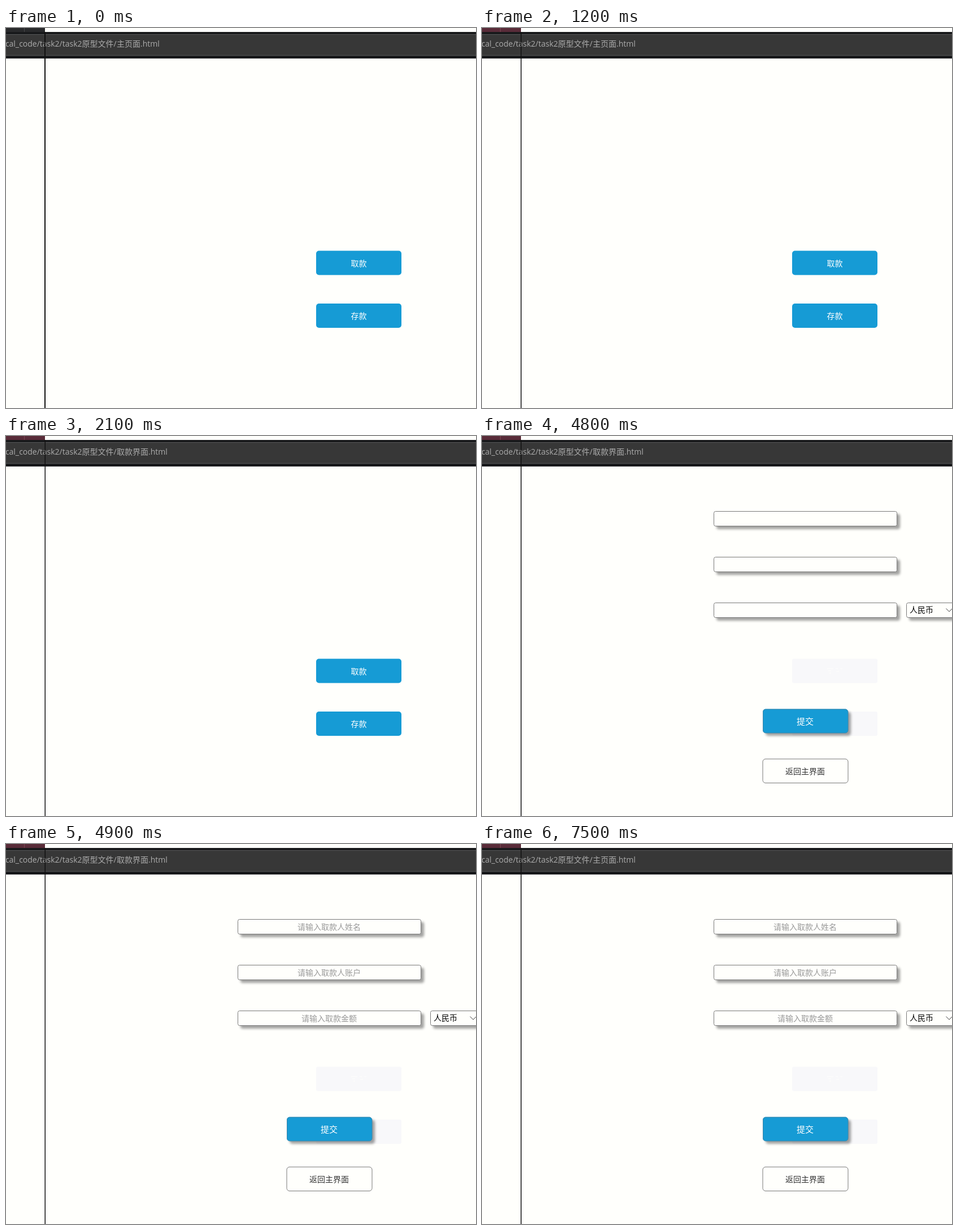
These frames come from a looping animation (832x673 px, 8000 ms). An HTML page:

```html
<!DOCTYPE html>
<html lang="zh-CN">
<head>
<meta charset="utf-8">
<title>取款</title>
<style>
html, body { margin: 0; width: 100%; height: 100%; overflow: hidden; background: #fffffc; }
svg { display: block; width: 100vw; height: 100vh; }
text { font: 14px "Noto Sans CJK SC", "Noto Sans CJK", sans-serif; }
.url { fill: #ababab; }
.latin { font-family: "Open Sans", "Noto Sans", sans-serif; }
.mid { text-anchor: middle; }
.hint { fill: #999; }
.box { fill: #fffffc; stroke: #797979; }
.blue { fill: #169bd5; }
.shade { filter: drop-shadow(5px 5px 2px rgba(0, 0, 0, .36)); }
.ghost { fill: #f8f8fa; }
</style>
</head>
<body>
<svg viewBox="0 0 832 673" preserveAspectRatio="none">
  <rect width="832" height="673" fill="#fffffc"/>
  <rect id="tab" width="69" height="7"/>
  <rect id="split" x="32" width="1" height="7"/>
  <rect y="7" width="832" height="47" fill="#18191b"/>
  <rect y="11" width="832" height="38" fill="#58595a"/>
  <rect y="12" width="832" height="36" fill="#373737"/>
  <g class="url">
    <text class="latin" x="134.5" y="33" text-anchor="end" textRendering="geometricPrecision">cal_code/task2/task2</text>
    <text x="134.5" y="33">原型文件</text>
    <text class="latin" x="190.5" y="33">/</text>
    <text id="page" x="196" y="33"></text>
    <text id="ext" class="latin" y="33">.html</text>
  </g>
  <rect id="edge" y="7" height="666" fill="#111"/>
  <g id="home"></g>
  <g id="form"></g>
</svg>
<script>
const LOOP = 8000;
const $ = id => document.getElementById(id);

const rect = (x, y, w, h, r, cls) =>
  `<rect x="${x}" y="${y}" width="${w}" height="${h}" rx="${r}" class="${cls}"/>`;
const label = (x, y, str, fill, cls = "mid", size = 14) =>
  `<text x="${x}" y="${y}" class="${cls}" fill="${fill}" style="font-size:${size}px">${str}</text>`;
const field = (y, hint) =>
  rect(410.5, y + .5, 324, 26, 3, "box shade") +
  label(572, y + 19, hint, "#999", "mid hint");

$("home").innerHTML =
  rect(549, 394.5, 151, 43, 5, "blue") + label(624.5, 422, "取款", "#fff") +
  rect(549, 488, 151, 43, 5, "blue") + label(624.5, 515, "存款", "#fff");

$("form").innerHTML =
  rect(549, 394.5, 151, 43, 3, "ghost") +
  '<path d="M611 412h11m-9 4h5m8-4h4m4 0h4m-23 8h3m9-3h5" stroke="#fffffc" fill="none"/>' +
  rect(549, 488, 151, 43, 3, "ghost") +
  field(133, "请输入取款人姓名") +
  field(214, "请输入取款人账户") +
  field(295, "请输入取款金额") +
  rect(751.5, 295.5, 100, 26, 3, "box shade") +
  label(757, 313, "人民币", "#000", "") +
  '<path d="M821.5 305.5l5.5 5.5 5.5-5.5" stroke="#444" fill="none"/>' +
  rect(497, 483.5, 151, 42.5, 5, "blue shade") +
  '<rect x="497.5" y="484" width="150.5" height="42" rx="5" fill="none" stroke="#3d86a8"/>' +
  label(572, 511, "提交", "#fff", "mid", 15) +
  rect(497, 572, 151, 42.5, 5, "box") +
  label(572, 599, "返回主界面", "#333");

const hints = document.querySelectorAll(".hint");
const show = (el, on) => el.setAttribute("visibility", on ? "visible" : "hidden");

function draw(t) {
  const hover = t >= 1200;
  const withdraw = t >= 2100 && t < 7500;
  const form = t >= 4800;
  $("tab").setAttribute("fill", hover ? "#592c39" : "#292a2c");
  $("split").setAttribute("fill", hover ? "#7b4553" : "#48494b");
  $("edge").setAttribute("x", hover ? 68.5 : 68);
  $("edge").setAttribute("width", hover ? 1.5 : 2);
  $("page").textContent = withdraw ? "取款界面" : "主页面";
  $("ext").setAttribute("x", withdraw ? 252 : 238);
  show($("home"), !form);
  show($("form"), form);
  hints.forEach(h => show(h, t >= 4900));
}

const start = performance.now();
function tick() {
  draw((performance.now() - start) % LOOP);
  requestAnimationFrame(tick);
}
tick();
</script>
</body>
</html>
```
